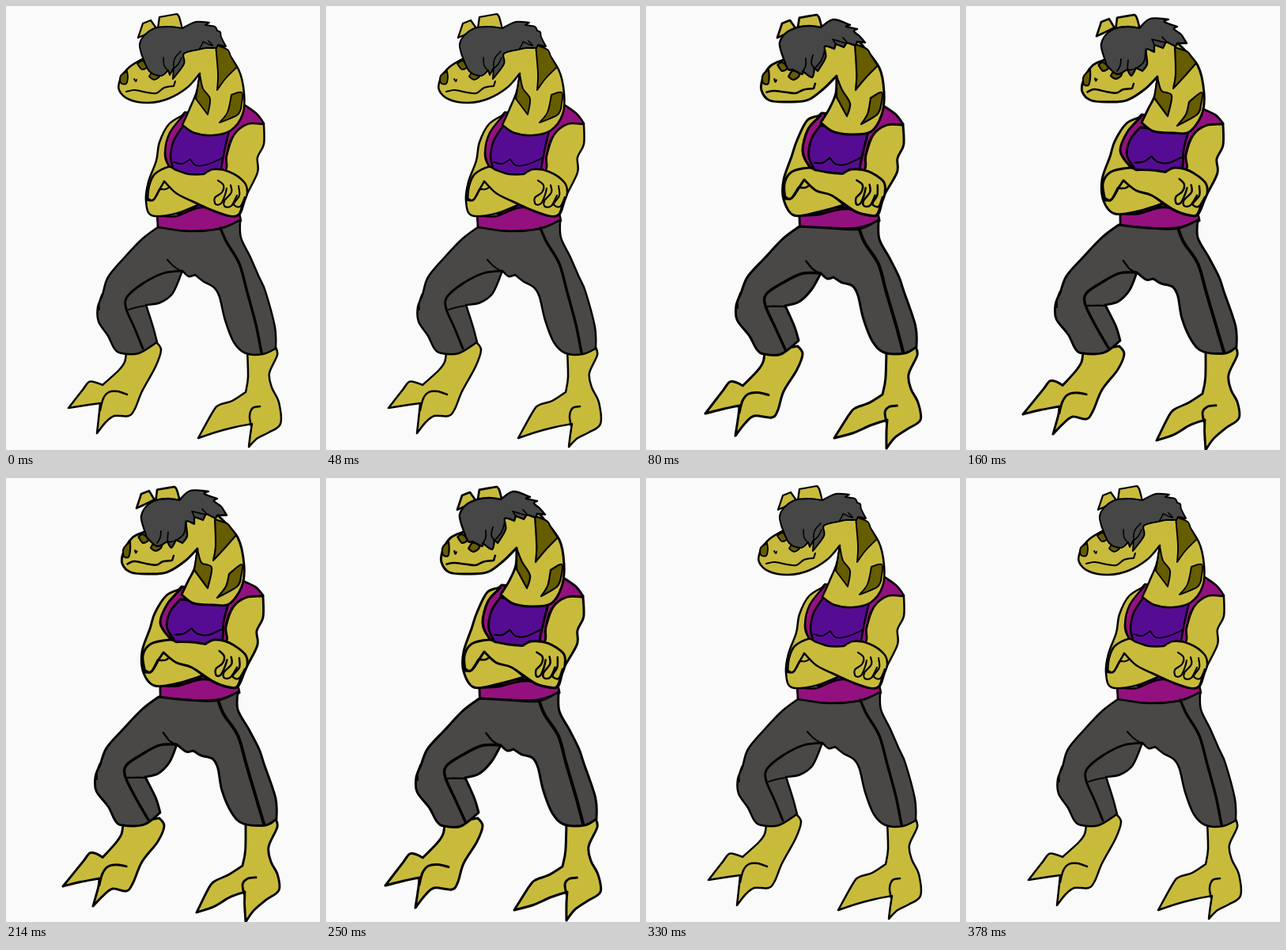
An HTML page for the animation above (0.41 s loop, 397 by 560 pixels).

```html
<!DOCTYPE html>
<html lang="en">
<head>
<meta charset="utf-8">
<title>Crossed arms</title>
<style>
html, body { margin: 0; width: 100%; height: 100%; overflow: hidden; background: #fafafa; }
svg { display: block; width: 100%; height: 100%; }
</style>
</head>
<body>
<svg id="stage" viewBox="0 0 397 560" stroke="#000" stroke-linecap="round" stroke-linejoin="round"></svg>
<script>
const SKIN = '#c8bb3c', SPOT = '#665c00', CLOTH = '#4a4846', HAIR = '#464646';
const PINK = '#93117e', VIOLET = '#560c92', NONE = 'none';
const WIDTHS = [2.5, 3, 2.9];

const layers = WIDTHS.map(() => '');
let handles = [];

const pairs = text => text.split(' ').map(p => p.split(',').map(Number));
const pt = p => p.map(n => +n.toFixed(1)).join(' ');

// Handles are "x,y,dx,dy,dx,dy": a place and its shift in the second and third pose.
function bendBy(text) { handles = pairs(text); }

function bend([x, y], pose) {
  if (!pose) return [x, y];
  let sum = 0, dx = 0, dy = 0;
  for (const h of handles) {
    const w = ((x - h[0]) ** 2 + (y - h[1]) ** 2 + 1) ** -2;
    sum += w;
    dx += w * h[pose * 2];
    dy += w * h[pose * 2 + 1];
  }
  return [x + dx / sum, y + dy / sum];
}

// Smooth curve through the points; "|" makes the point before it a corner.
function curve(text, move) {
  let last = null, d = '';
  for (const run of text.split('|')) {
    const pts = pairs(run).map(move);
    if (last) pts.unshift(last); else d = 'M' + pt(pts[0]);
    for (let i = 0; i + 1 < pts.length; i++) {
      const b = pts[i], c = pts[i + 1], a = pts[i - 1] || b, e = pts[i + 2] || c;
      const c1 = b.map((v, k) => v + (c[k] - a[k]) / 6);
      const c2 = c.map((v, k) => v - (e[k] - b[k]) / 6);
      d += `C${pt(c1)} ${pt(c2)} ${pt(c)}`;
    }
    last = pts[pts.length - 1];
  }
  return d;
}

function add(pose, fill, weight, d) {
  layers[pose] += `<path d="${d}" fill="${fill}" stroke-width="${(WIDTHS[pose] * weight).toFixed(2)}"/>`;
}

function part(fill, weight, text) {
  WIDTHS.forEach((_, pose) => add(pose, fill, weight, curve(text, p => bend(p, pose))));
}

const line = (weight, text) => part(NONE, weight, text);

function feet() {
  bendBy('79,507,-4,7,-7,8 119,501,-1,3,-1,4 104,474,1,0,1,-1 115,539,-2,3,-5,1 137,517,0,0,-2,1 155,517,4,2,-3,4 172,486,2,0,0,-2 196,434,2,5,4,5 152,440,-2,0,-4,0');
  part(SKIN, 1, '152,436 150,449 142,460 122,478|114,475 105,474 97,484 79,507|98,504 119,501|118,512 115,539|126,525 137,517 155,517 163,508 172,486 189,455 196,434 190,424|152,436');
  line(1, '119,510 123,495 130,487 141,486 153,490');
  bendBy('243,545,-5,0,-2,3 311,527,-6,-5,-9,-5 307,556,-3,2,-4,4 347,527,0,-5,-2,-7 343,440,0,0,0,0 305,440,-1,0,-2,0 303,487,-4,3,-4,2 336,481,-1,2,-1,3 262,511,-5,4,-5,5');
  part(SKIN, 1, '305,434 306,468 303,487|286,498 270,503 262,511 243,545|267,537 290,531 311,527|309,540 307,556|318,545 332,538 347,527 345,500 336,481 333,463 343,440 340,428|305,434');
  line(1, '310,530 308,517 312,507 321,505');
}

function shirt() {
  part(PINK, 1, '226,134 206,160 201,185 207,206|195,262|295,262|280,205 280,185 290,162 326,148|317,136 302,125|280,138|226,134');
  part(VIOLET, 1, '224,151 212,170 208,190 211,204|215,254|265,256|272,206 276,183 283,154|250,155|224,151');
  line(.7, '212,197 223,199 233,193|240,201 254,200 273,192');
  part(PINK, 1, '191,264 215,265 248,254 295,261|297,271|268,281 230,284 192,279|191,264');
}

function trousers() {
  bendBy('192,279,2,-1,1,-3 149,318,0,1,-2,0 116,380,-2,-2,-3,-3 146,438,3,1,1,0 191,424,2,-2,4,-2 177,377,-1,1,-1,0 211,362,-2,-4,-4,-4 223,334,-2,3,-7,2 239,339,-2,3,-2,5 263,355,-2,-2,-2,-1 277,396,-2,-1,-4,-2 303,438,-2,-1,-3,-2 341,432,1,-2,1,-2 328,360,-2,0,-2,0 320,342,0,0,0,0 297,292,-2,2,-4,0 296,270,-2,0,-3,0 230,284,0,-4,0,-4 173,432,3,1,7,-1 323,437,2,-1,3,-1 152,380,-1,-4,-1,-5');
  part(CLOTH, 1, '192,279 172,294 149,318 129,342 122,364 116,380 117,398 129,416 137,432 146,438 168,438 191,424|186,405 177,377|195,374 211,362 223,334|231,341 239,339|249,347 263,355 270,367 277,396 288,424 303,438 325,439 341,432|340,405 328,360 320,342 309,317 297,292 296,270|270,281 230,284 192,279');
  line(.8, '204,320 213,329 223,335');
  line(1.15, '222,334 199,337 173,350 153,367 152,382 162,405 173,432');
  line(.8, '177,378 165,380 155,383');
  line(1.35, '271,280 279,298 295,325 305,361 316,402 323,437');
  line(.7, '121,364 118,374 118,383');
}

function bendTorso() {
  bendBy('226,137,-4,1,-4,3 205,150,-2,-5,-3,-1 190,195,-6,-5,-8,-5 180,222,-6,-3,-8,-3 177,246,-3,-2,-3,0 184,264,3,0,4,-2 214,262,3,-2,3,-3 247,249,3,2,2,0 206,202,1,1,2,1 201,185,-3,-2,-6,-2 231,212,0,-2,3,-5 262,206,-2,0,2,-2 301,222,-1,-1,1,0 305,236,-3,0,0,0 284,264,-1,-1,-1,-1 235,246,0,-7,0,-7 200,221,0,-2,-1,-1 326,149,-1,1,-1,0 318,191,0,1,-1,2 302,125,0,2,-2,5 279,189,-1,-1,-1,-1 295,262,-2,0,-2,0 230,284,0,-4,0,-4');
}

function arms() {
  part(SKIN, 1, '225,137 206,149 194,172 190,195 180,222 177,246 184,264 214,262 247,249|225,225|206,202 201,185 207,160 225,137');
  part(SKIN, 1, '326,149 326,174 318,191 318,210 304,239 296,262 284,265 261,258 236,246|250,215|277,208 279,189 288,163 305,149 326,149');
  part(SKIN, 1, '179,245 181,227 188,212 205,203 213,206|231,212 250,212|262,206 282,209 301,222 305,236 299,251 294,263 284,265 262,258 235,246 215,236 200,221|195,230 187,244 179,245');
  line(.85, '180,243 186,245 194,231|202,231 207,228');
  line(.85, '268,220 275,226 273,235 264,242 265,250 272,249 277,238 279,230');
  line(.85, '284,226 285,235 276,246 277,253 285,252 292,239');
  line(.85, '294,227 295,239 288,250 296,253 302,241');
}

function head() {
  bendBy('143,100,3,0,4,2 156,118,0,1,2,1 180,122,-1,-1,0,-1 229,103,-4,1,-3,2 245,85,-4,3,-3,4 241,108,-1,2,-2,4 223,150,-2,-3,-1,-3 262,163,-1,-1,0,-3 299,137,-1,0,-1,0 294,80,1,-2,-1,-5 156,77,2,-2,4,-2 265,49,-1,-1,-1,3 270,105,-2,0,-5,-2 256,137,-1,2,0,2 258,117,0,6,2,-4 240,117,1,-2,-2,-1 298,109,0,0,0,0 270,147,2,2,-3,4 285,112,-1,4,-3,9 212,101,0,3,-2,3 163,106,-1,1,-1,-1 173,74,0,2,1,2 188,87,-1,0,2,-1');
  part(SKIN, 1, '174,66 156,77 145,91 143,106 156,118 180,122 205,117 229,103 245,85|241,108 232,130 223,150|238,160 262,163 284,157 299,137 301,110 294,80 270,45|220,35|174,66');
  part(SPOT, .75, '153,82 145,88 145,97 152,98 154,90 153,82');
  part(SPOT, .75, '166,73 172,69 179,76 172,80 166,73');
  part(SPOT, .75, '181,89 186,82 195,82 194,89 187,93 181,89');
  line(.75, '162,92 164,95 165,93');
  line(.85, '152,108 163,106 178,109 190,110 200,103 212,101|214,95');
  part(SPOT, .75, '265,49|280,55 284,63 292,77|278,91 267,106|268,85 265,49');
  part(SPOT, .75, '245,86|249,104 258,117 255,137|240,117|245,86');
  part(SPOT, .75, '285,112|298,109 298,123 293,137 270,147|280,134 285,112');
}

function horns() {
  bendBy('175,25,-1,0,-2,-2 205,20,0,1,-3,1');
  part(SKIN, .9, '167,40|173,22|183,18|190,28|176,36|167,40');
  part(SKIN, .9, '192,28|194,14|216,10|219,14 223,29|192,28');
}

function hair(pose, shape, ...strands) {
  add(pose, HAIR, .8, curve(shape, p => p));
  strands.forEach(s => add(pose, NONE, .6, curve(s, p => p)));
}

feet();
bendTorso();
shirt();
trousers();
bendTorso();
arms();
head();
horns();
hair(0, '171,60 169,48 175,37 188,28 205,26 223,28|240,20 257,21|252,24|264,26 267,31|271,33 272,39 278,51|268,49|266,53|253,53 243,55|225,60 225,73 211,92|212,78|207,87|205,81|196,88 181,82 171,60',
  '221,57 213,67 212,79|218,73 222,65', '205,82 200,75 199,65', '244,55 248,48 249,45|261,50 256,44');
hair(1, '171,58 169,46 177,34 191,27 207,25 221,27|237,17 258,24|253,26 267,29|263,32 270,38 277,46|267,45|265,50|254,46|250,52|240,48|238,54|226,51 227,65 217,82|213,78|210,90 198,82|197,86 185,80|179,79 171,58',
  '226,55 222,68 213,79|209,72 211,62', '198,83 202,75 202,66', '240,48 236,42|254,47 249,40');
hair(2, '173,60 171,48 178,35 190,28 205,26 219,28|233,16 256,17|251,20 267,26|263,29 272,36 279,47|267,47|265,51|253,45|249,53|238,49|238,58|228,55 229,73 223,82|215,78|209,88 204,80|191,86 178,75|173,60',
  '227,55 225,70 215,79|205,80 205,68', '191,82 195,75 196,67', '238,49 235,42|253,46 248,39');

const stage = document.getElementById('stage');
stage.innerHTML = layers.map(l => `<g>${l}</g>`).join('');

const LOOP = 410, CUTS = [80, 160, 250, 330], ORDER = [0, 1, 2, 1, 0];
const groups = [...stage.children];

function draw(ms) {
  const t = ms % LOOP;
  const pose = ORDER[CUTS.filter(c => t >= c).length];
  groups.forEach((g, i) => g.setAttribute('display', i === pose ? 'inline' : 'none'));
}

const start = performance.now();
function tick() {
  draw(performance.now() - start);
  requestAnimationFrame(tick);
}
tick();
</script>
</body>
</html>
```
